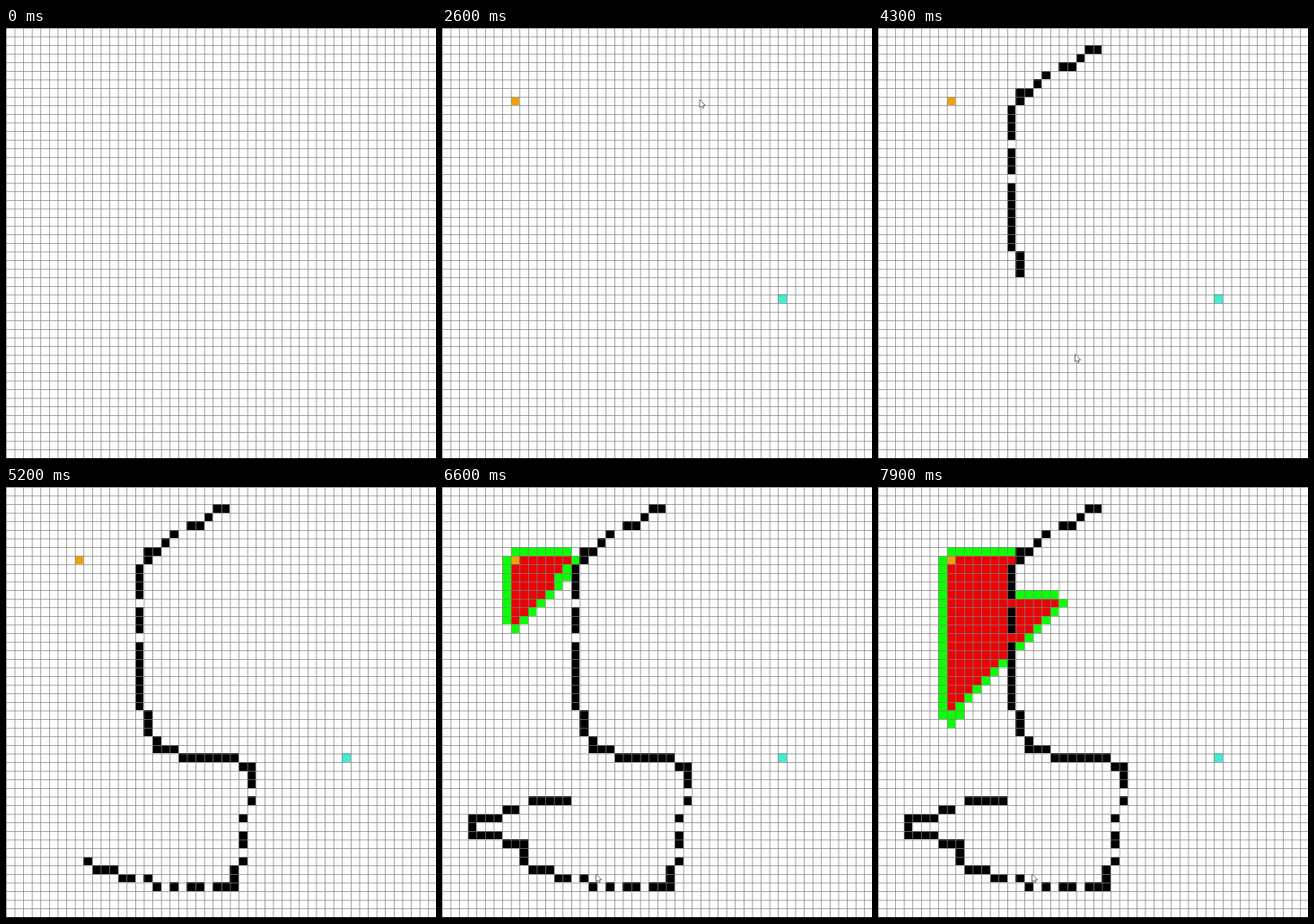
An HTML page with a canvas for the animation above (8000 ms loop, 479x481 px).

```html
<!DOCTYPE html>
<html lang="en">
<head>
<meta charset="utf-8">
<title>Grid path search</title>
<style>
html, body { margin: 0; width: 100%; height: 100%; overflow: hidden; background: #fdfdfd; }
canvas { display: block; }
</style>
</head>
<body>
<canvas id="stage" width="479" height="481"></canvas>
<script>
const ctx = document.getElementById('stage').getContext('2d');
const LOOP = 8000, TICK = 100, ROWS = 50, PITCH = 9.6, LINE = 0.7, MAX_STEPS = 130;
const COLOR = { paper: '#fdfdfd', start: '#eea20c', goal: '#46ebd0', wall: '#000', open: '#0bff05', closed: '#e80505' };
const start = [8, 8], goal = [39, 31];

const clamp = x => Math.min(1, Math.max(0, x));
const progress = (t, from, to) => clamp((t - from) / (to - from));
const mix = (a, b, p) => a + (b - a) * p;
const smooth = p => p * p * (3 - 2 * p);

// The hand-drawn wall: corner cells, and the cells the fast pointer jumped over.
const corners = `25,2 22,4 17,7 16,7 16,8 15,25 16,26 17,29 17,30 19,30 20,31 26,31 27,32 28,32 28,36
  27,43 26,46 17,46 13,45 10,44 9,43 9,41 7,41 3,40 3,38 6,38 8,37 14,36`
  .split(/\s+/).map(p => p.split(',').map(Number));
const skipped = new Set([5, 15, 19, 46, 48, 50, 53, 60, 63, 65, 68, 90]);
const FIRST_STROKE = 31;

function trace(points) {
  const cells = [points[0]];
  points.slice(1).forEach(([c, r], i) => {
    const [c0, r0] = points[i], n = Math.max(Math.abs(c - c0), Math.abs(r - r0));
    for (let k = 1; k <= n; k++) {
      cells.push([mix(c0, c, k / n), mix(r0, r, k / n)].map(v => Math.floor(v + 1e-6)));
    }
  });
  return cells;
}
const stroke = trace(corners);
const isWall = (_, i) => !skipped.has(i);

function wallLength(t) {
  const first = FIRST_STROKE * progress(t, 3300, 3800);
  const second = 1 - (1 - progress(t, 4400, 5900)) ** 1.5;
  return Math.floor(first + (stroke.length - FIRST_STROKE) * second);
}

// The search gains a little speed as it runs.
function searchStep(t) {
  const s = Math.max(0, t - 6000) / 1000;
  return Math.round(52.5 * s + 6.6 * s * s);
}

// A* with Manhattan distance; ties go to the cell that was queued first.
function search() {
  const id = (c, r) => r * ROWS + c;
  const far = (c, r) => Math.abs(c - goal[0]) + Math.abs(r - goal[1]);
  const blocked = new Set(stroke.filter(isWall).map(([c, r]) => id(c, r)));
  const seen = new Map();
  const queue = [];
  const add = (c, r, g, opened) => {
    const node = { c, r, g, f: g + far(c, r), opened, closed: Infinity };
    seen.set(id(c, r), node);
    queue.push(node);
  };
  add(...start, 0, 0);
  for (let step = 1; step <= MAX_STEPS; step++) {
    const best = queue.reduce((b, n, i) => n.f < queue[b].f ? i : b, 0);
    const [now] = queue.splice(best, 1);
    now.closed = step;
    for (const [dc, dr] of [[0, 1], [0, -1], [1, 0], [-1, 0]]) {
      const c = now.c + dc, r = now.r + dr;
      const inside = Math.min(c, r) >= 0 && Math.max(c, r) < ROWS;
      if (inside && !blocked.has(id(c, r)) && !seen.has(id(c, r))) add(c, r, now.g + 1, step);
    }
  }
  return [...seen.values()];
}
const nodes = search();

// Cells snap to the pixel that holds the middle of their grid line.
const edge = i => Math.floor(i * PITCH + LINE / 2);

function cell(c, r, color) {
  ctx.fillStyle = color;
  ctx.fillRect(edge(c), edge(r), edge(c + 1) - edge(c), edge(r + 1) - edge(r));
}

function grid() {
  ctx.fillStyle = '#808080';
  for (let i = 0; i < ROWS; i++) {
    ctx.fillRect(i * PITCH, 0, LINE, 480);
    ctx.fillRect(0, i * PITCH, 479, LINE);
  }
  ctx.fillStyle = '#111';
  ctx.fillRect(0, 480, 479, 1);
}

const arrow = new Path2D('M.5 .5V9L2.5 7.5L4 10.2L5.2 9.6L4.2 7H6.8Z');
const stops = [
  { t: 100, x: 118, y: 101 }, { t: 500, x: 80, y: 78 }, { t: 800, x: 80, y: 78 },
  { t: 1700, x: 467, y: 373 }, { t: 2000, x: 467, y: 373 }, { t: 2300, x: 324, y: 94 },
  { t: 2600, x: 286.5, y: 79.4 }, { t: 3300, x: 299, y: 30 }
];

// The pointer is hidden while it draws.
function pointerAt(t) {
  if (t >= 5900) return [171, 431.4];
  if (t >= 4100 && t < 4500) return [219, 363.4];
  const i = stops.findIndex(s => s.t >= t);
  if (i < 0 || t < stops[0].t) return null;
  const b = stops[i], a = stops[i - 1] || b;
  const p = a === b ? 1 : smooth(progress(t, a.t, b.t));
  return [mix(a.x, b.x, p), mix(a.y, b.y, p)];
}

function pointer(t) {
  const at = pointerAt(t);
  if (!at) return;
  ctx.save();
  ctx.translate(...at);
  ctx.fillStyle = '#fff';
  ctx.strokeStyle = '#555';
  ctx.lineWidth = 0.8;
  ctx.fill(arrow);
  ctx.stroke(arrow);
  ctx.restore();
}

function draw(t) {
  ctx.fillStyle = COLOR.paper;
  ctx.fillRect(0, 0, 479, 481);
  stroke.slice(0, wallLength(t)).filter(isWall).forEach(([c, r]) => cell(c, r, COLOR.wall));
  const step = searchStep(t);
  if (step > 0) {
    nodes.filter(n => n.opened <= step)
      .forEach(n => cell(n.c, n.r, n.closed < step ? COLOR.closed : COLOR.open));
  }
  if (t >= 500) cell(...start, COLOR.start);
  if (t >= 1800) cell(...goal, COLOR.goal);
  grid();
  pointer(t);
}

const begin = performance.now();
function frame() {
  const t = (performance.now() - begin) % LOOP;
  draw(Math.floor(t / TICK) * TICK);
  requestAnimationFrame(frame);
}
frame();
</script>
</body>
</html>
```
